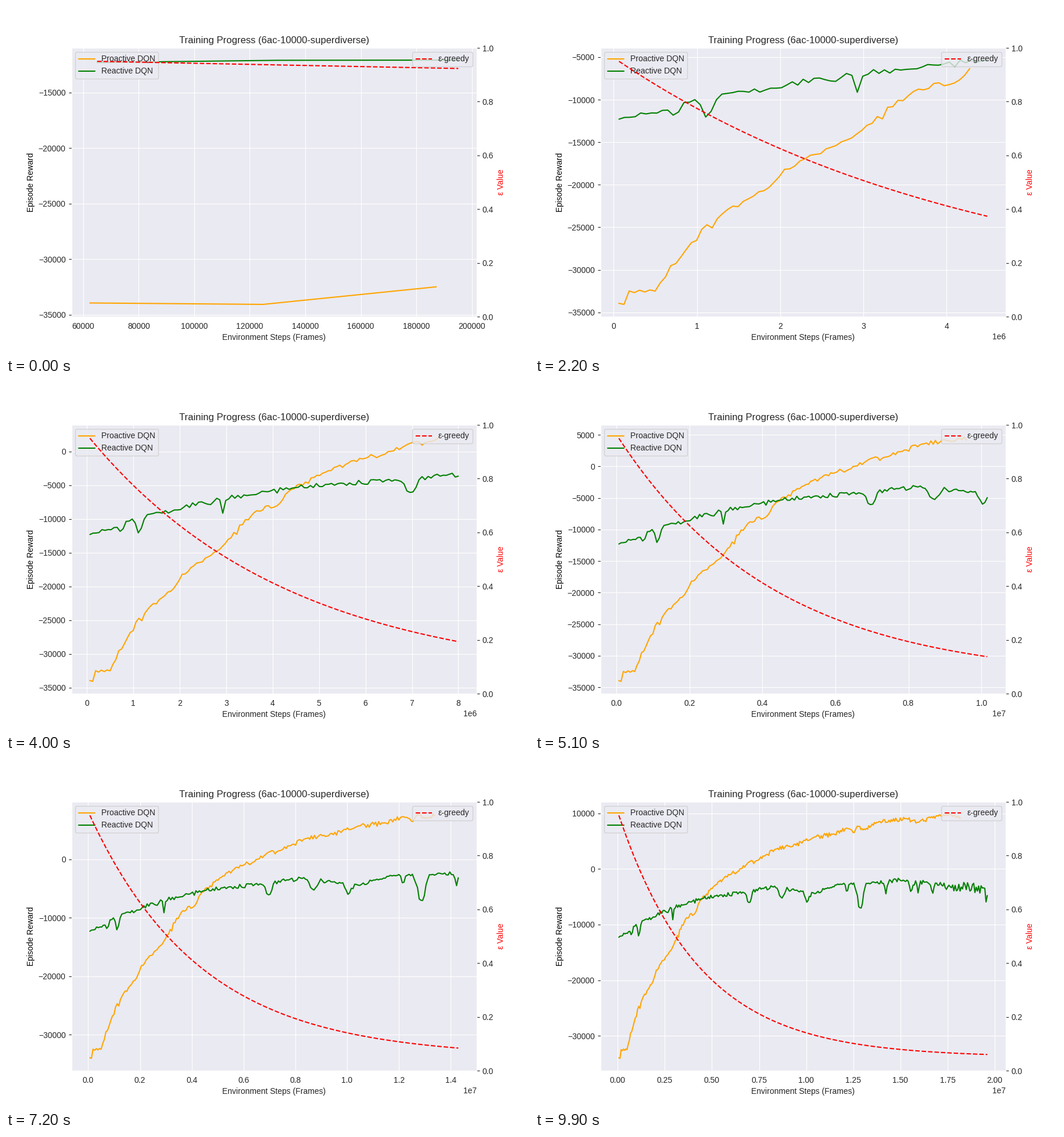
A matplotlib script for the animation above (10000 ms loop, 900 px wide and 600 px high).

```python
import numpy as np
import matplotlib.pyplot as plt
from matplotlib.animation import FuncAnimation

FRAMES, PER_FRAME = 100, 3
TOTAL = FRAMES * PER_FRAME
DARK = "0.15"

plt.rcParams.update({
    "font.family": "Liberation Sans",
    "text.color": DARK,
    "axes.labelcolor": DARK,
    "axes.facecolor": "#EAEAF2",
    "axes.edgecolor": "white",
    "axes.grid": True,
    "axes.axisbelow": True,
    "grid.color": "white",
    "grid.linestyle": "-",
    "xtick.color": DARK,
    "ytick.color": DARK,
    "xtick.bottom": False,
    "ytick.left": False,
    "lines.solid_capstyle": "round",
})

# Key points of each learning curve: (episode, reward in thousands).
PRO_KEYS = [
    (1, -33.93), (2, -34.06), (3, -32.48), (8, -32.5), (14, -27.6),
    (22, -22.9), (29, -20.7), (36, -17.2), (42, -15.6), (48, -13.6),
    (58, -9.05), (66, -8.04), (71, -5.6), (82, -3.2), (92, -1.4),
    (103, -0.5), (112, 1.1), (120, 1.5), (137, 3.6), (150, 4.0),
    (169, 5.6), (186, 6.22), (199, 7.3), (205, 6.5), (208, 7.7),
    (213, 7.0), (226, 8.35), (251, 9.06), (262, 8.4), (285, 9.69), (300, 9.15)]
REA_KEYS = [
    (1, -12.29), (3, -12.07), (10, -11.1), (15, -9.95), (21, -9.26),
    (30, -8.65), (38, -7.45), (41, -7.85), (43, -6.92), (55, -6.4),
    (68, -5.41), (80, -4.85), (103, -4.2), (118, -3.5), (130, -3.3),
    (145, -3.85), (160, -4.4), (175, -3.2), (184, -2.56), (208, -2.35),
    (232, -2.02), (257, -2.6), (270, -3.2), (298, -3.5), (299, -5.94), (300, -4.79)]
# Short collapses of the reactive agent: (episode, half width, depth).
REA_DIPS = [
    (11.5, 1, 1.2), (17.4, 1.2, 2.6), (45, 0.7, 2.1), (107.4, 2.4, 2.0),
    (133.6, 2.3, 2.1), (154.3, 2.2, 1.8), (186.7, 1.3, 1.8), (197.3, 3, 4.9),
    (217.8, 1.3, 2.0), (238.5, 1.8, 2.0), (244, 1, 2.1), (255.8, 1.2, 1.7)]

rng = np.random.default_rng(4)
episode = np.arange(1, TOTAL + 1)


def rewards(keys, jitter):
    """Follow the key points, with noise that fades out close to each."""
    at, value = np.transpose(keys)
    gap = np.abs(episode[:, None] - at).min(axis=1)
    noise = rng.uniform(-1, 1, TOTAL) * jitter * np.minimum(1, gap / 3)
    return 1000 * (np.interp(episode, at, value) + noise)


def dips(items):
    return 1000 * sum(depth * np.exp(-((episode - mid) / width) ** 2)
                      for mid, width, depth in items)


pro_x = episode * (62400 - 6 * episode)
rea_x = 65030 * episode + 530 * np.maximum(0, episode - 123)
pro_y = rewards(PRO_KEYS, np.interp(episode, [1, 60, 120], [0.7, 0.5, 0.4]))
rea_y = rewards(REA_KEYS, np.interp(episode, [1, 255, 270], [0.35, 0.4, 0.9]))
rea_y -= dips(REA_DIPS)
epsilon = 0.05 + 0.9 * np.exp(-0.01505 * (episode - 1))

fig, ax = plt.subplots(figsize=(9, 6), dpi=100)
ax_eps = ax.twinx()
ax_eps.grid(False)
ax_eps.set_ylim(0, 1)

pro_line, = ax.plot([], [], color="orange", label="Proactive DQN")
rea_line, = ax.plot([], [], color="green", label="Reactive DQN")
eps_line, = ax_eps.plot([], [], "--", color="red", label="ε-greedy")

ax.set_title("Training Progress (6ac-10000-superdiverse)")
ax.set_xlabel("Environment Steps (Frames)")
ax.set_ylabel("Episode Reward", color="black")
ax_eps.set_ylabel("ε Value", color="red")
ax.legend(loc="upper left")
ax_eps.legend(loc="upper right")


def padded(lo, hi):
    pad = 0.05 * (hi - lo)
    return lo - pad, hi + pad


def update(i):
    n = PER_FRAME * (i + 1)
    pro_line.set_data(pro_x[:n], pro_y[:n])
    rea_line.set_data(rea_x[:n], rea_y[:n])
    eps_line.set_data(rea_x[:n], epsilon[:n])
    ax.set_xlim(*padded(pro_x[0], rea_x[n - 1]))
    ax.set_ylim(*padded(pro_y[:n].min(), max(pro_y[:n].max(), rea_y[:n].max())))
    return pro_line, rea_line, eps_line


anim = FuncAnimation(fig, update, frames=FRAMES, interval=100,
                     init_func=lambda: update(0), repeat=True, repeat_delay=0)
plt.show()
```
